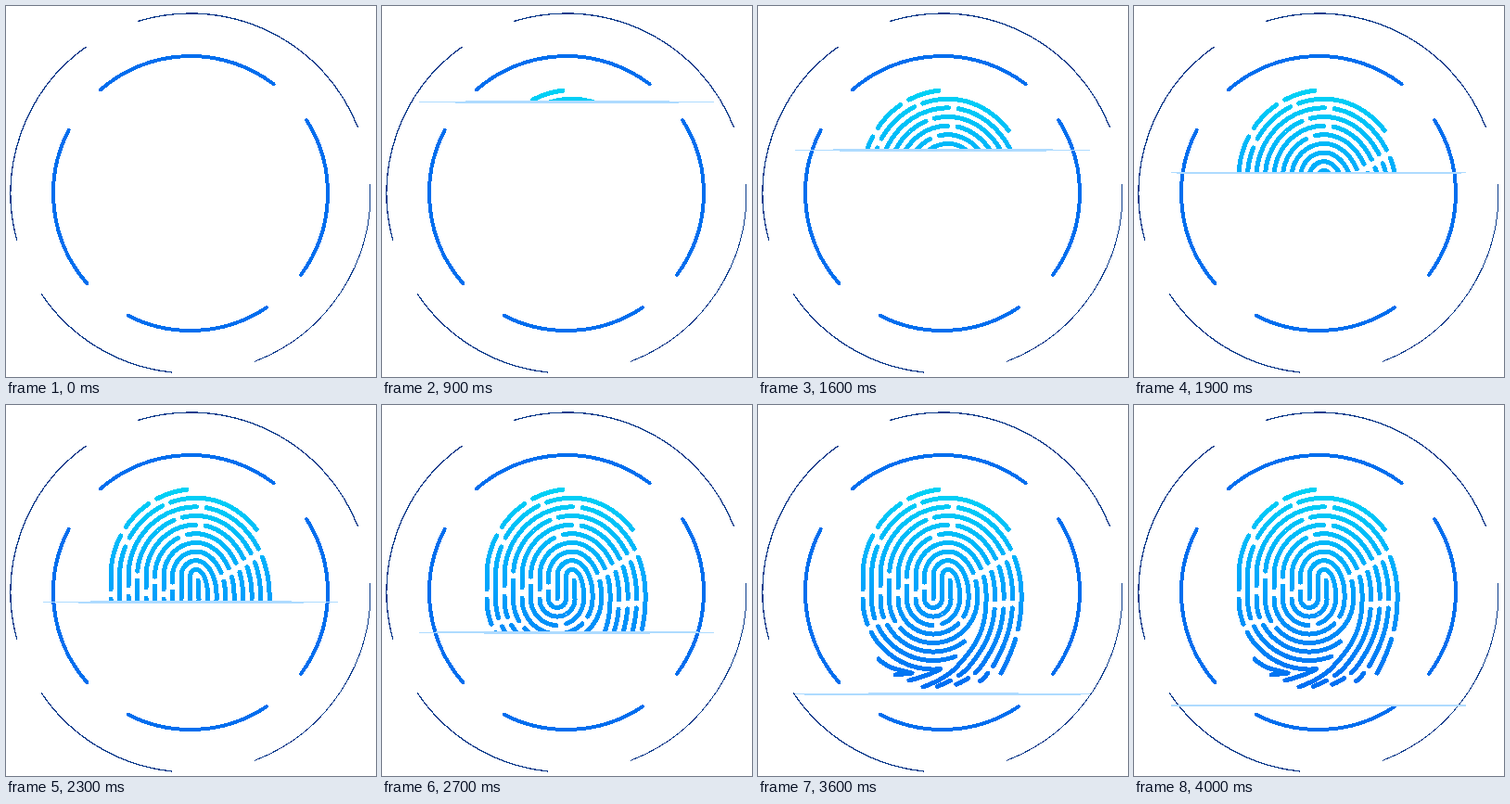
An HTML page that plays this animation: 399 by 400 pixels, repeating every 4.1 s.

```html
<!DOCTYPE html>
<html lang="en">
<head>
<meta charset="utf-8">
<title>Fingerprint scan</title>
<style>
  html, body { margin: 0; width: 100%; height: 100%; overflow: hidden; background: #fff; }
  svg { display: block; width: 399px; height: 400px; shape-rendering: crispEdges; }
  path { fill: none; stroke-linecap: round; stroke-linejoin: round; }
</style>
</head>
<body>
<svg viewBox="0 0 399 400">
  <defs>
    <linearGradient id="tint" gradientUnits="userSpaceOnUse" x1="0" y1="90" x2="0" y2="300">
      <stop offset="0" stop-color="#00d2f5"/>
      <stop offset=".5" stop-color="#00a4fc"/>
      <stop offset="1" stop-color="#0070f2"/>
    </linearGradient>
    <clipPath id="seen"><rect id="mask" width="399" height="0"/></clipPath>
  </defs>
  <path id="thin" stroke="#0c3c8c" stroke-width="1"/>
  <path id="outer" stroke="#0c3c8c" stroke-width="1.3"/>
  <path id="inner" stroke="#006eee" stroke-width="4"/>
  <g clip-path="url(#seen)"><path id="print" stroke="url(#tint)" stroke-width="5"/></g>
  <polygon id="beam" fill="#aedbff" points="40,-.5 120,-1.4 280,-1.4 358,-.5 358,.5 280,1.4 120,1.4 40,.5"/>
</svg>
<script>
const $ = id => document.getElementById(id);
const setPath = (id, d) => $(id).setAttribute('d', d);

function polar(cx, cy, r, deg) {
  const a = deg * Math.PI / 180;
  return `${cx + r * Math.cos(a)} ${cy + r * Math.sin(a)}`;
}

// Circular frame: pairs of start and end angles, clockwise from the right.
const arcs = (r, ...spans) => spans.map(([a, b]) =>
  `M${polar(199, 202, r, a)}A${r} ${r} 0 0 1 ${polar(199, 202, r, b)}`).join('');
setPath('inner', arcs(148, [-131, -52.7], [-32.3, 36.5], [56.3, 117], [139, 207.4]));
setPath('outer', arcs(194, [-107, -21.7], [96, 145.8], [165, 234.4]));
setPath('thin', arcs(194, [-2.7, 69]));

// Ridges are spaced evenly on both sides of the core.
const GAP = 9.5, CORE = 208, LEGS = 209;
const left = k => CORE - GAP * k, right = k => CORE + GAP * k;

// Draws a path as pieces, leaving a break at each fraction of its length.
function split(d, cuts = []) {
  const p = document.createElementNS('http://www.w3.org/2000/svg', 'path');
  p.setAttribute('d', d);
  const len = p.getTotalLength(), n = Math.ceil(len);
  let out = '', pen = false;
  for (let i = 0; i <= n; i++) {
    const s = len * i / n, { x, y } = p.getPointAtLength(s);
    const cut = cuts.some(c => Math.abs(s - c * len) < 4.7);
    if (!cut) out += `${pen ? 'L' : 'M'}${x.toFixed(1)} ${y.toFixed(1)}`;
    pen = !cut;
  }
  return out;
}

// Upper ridge: round left shoulder, longer right one; the outer two stop early.
function arch(k) {
  const apex = 205, top = 187 - 9.64 * k;
  const start = `M${left(k)} ${LEGS}V185A${apex - left(k)} ${185 - top} 0 0 1 `;
  if (k === 10) return split(start + '195 91.2', [.03, .47, .755]);
  const end = k === 9 ? '270 134' : `${right(k)} 205V${LEGS}`;
  const d = `${start}${apex} ${top}A${right(k) - apex} ${205 - top} 0 0 1 ${end}`;
  if (k === 9) return split(d, [.27, .53]);
  const odd = k % 2, cuts = [];
  if (k > 2) cuts.push(.03 + .07 * odd, .82);
  if (k > 4) cuts.push(.52 - .1 * odd);
  return split(d, cuts);
}

// Lower ridge: a half circle, cut short for the larger ones.
function bowl(j) {
  const cx = left(2), r = GAP * j, end = j > 5 ? 54 + 15 * (j - 6) : 0;
  const tip = j === 8 ? 'Q183 292 163 297' : '';
  const cuts = j > 4 ? [.2] : j > 2 ? [.55 + .24 * (j - 3)] : [];
  return split(`M${cx - r} ${LEGS}A${r} ${r} 0 0 0 ${polar(cx, LEGS, r, end)}${tip}`, cuts);
}

// Right leg sweeping down to the lower left.
function tail(i) {
  const x = right(4 + i);
  const d = `M${x} ${LEGS}C${x} 240 ${236 + 10 * i} 259 ${218 + 12 * i} ${278 + i}` +
    `Q${206 + 13 * i} 294 ${178 + 13 * i + 2.5 * i * i} ${304 - .7 * i * i}`;
  return split(d, i ? [.05, .83] : []);
}

let print = 'M207 189Q208 195 208 209M130 274Q138 282 150 285L166 289L148 291';
for (let k = 1; k <= 10; k++) print += arch(k);
for (let j = 1; j <= 8; j++) print += bowl(j);
for (let i = 0; i < 4; i++) print += tail(i);
print += split(`M${right(8)} ${LEGS}C284 235 277 262 262 289`, [.46]);
setPath('print', print);

const LOOP = 4100, STEP = 100, START = 600;

// Slow entry, steady scan, soft stop.
function beamY(t) {
  if (t < 1300) return 83 + 48 * (t - START) / 700;
  if (t < 3200) return 131 + 155 * (t - 1300) / 1900;
  return 324 - 38 * Math.pow(1 - (t - 3200) / 800, 1.65);
}

function draw(ms) {
  const t = Math.floor(ms % LOOP / STEP) * STEP;
  const on = t >= START, y = on ? beamY(t) : 0;
  $('mask').setAttribute('height', y);
  $('beam').setAttribute('transform', `translate(0 ${y})`);
  $('beam').setAttribute('visibility', on ? 'visible' : 'hidden');
}

const begin = performance.now();
function tick() {
  draw(performance.now() - begin);
  requestAnimationFrame(tick);
}
tick();
</script>
</body>
</html>
```
